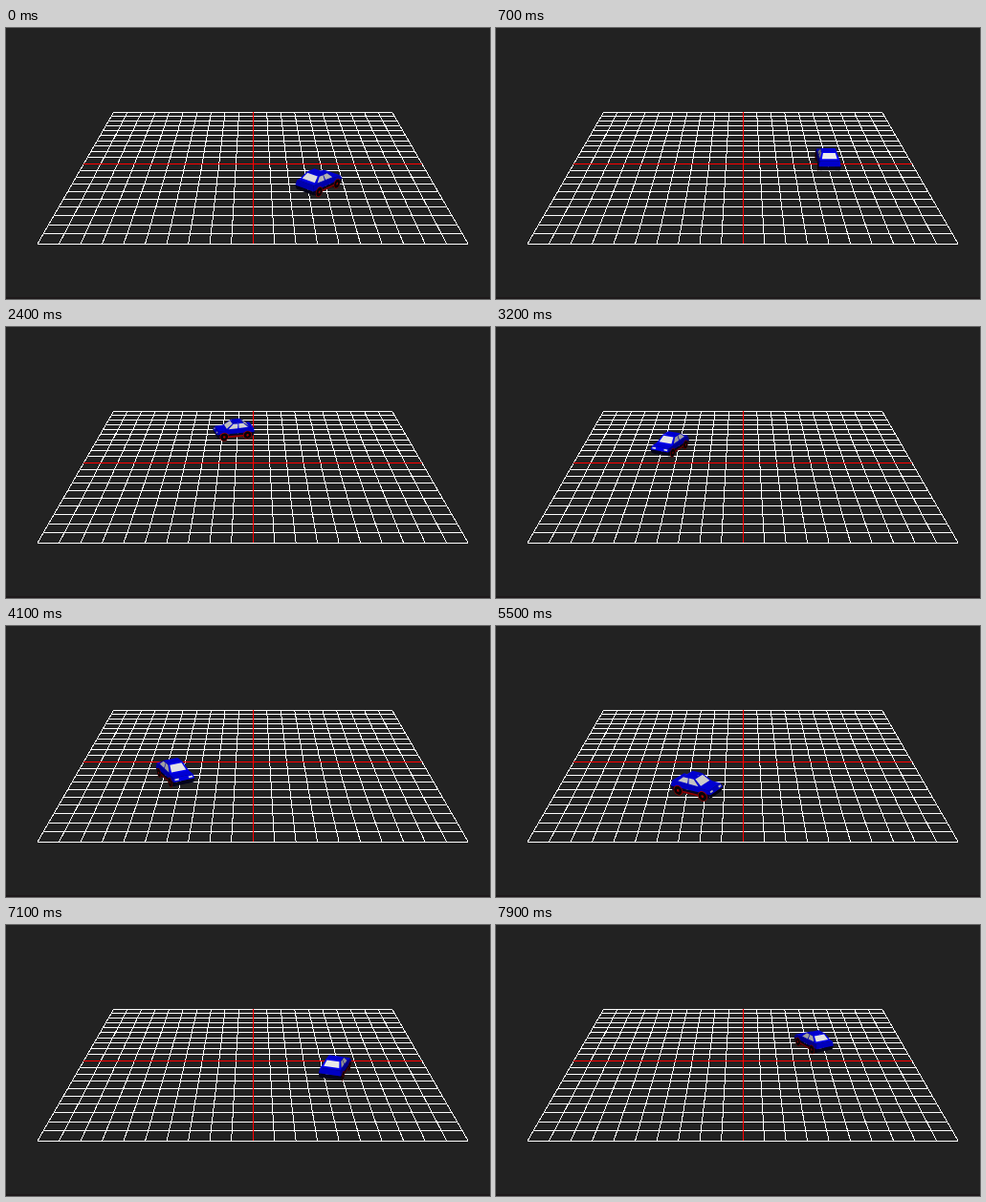
An HTML page for the animation above (8 s loop, 506x284 px).

```html
<!DOCTYPE html>
<html lang="en">
<head>
<meta charset="utf-8">
<title>Car on a grid</title>
<style>
  html, body { margin: 0; height: 100%; overflow: hidden; background: #222; }
  svg { display: block; width: 506px; height: 284px; }
</style>
</head>
<body>
<svg viewBox="0 0 506 284">
  <rect y="282" width="506" height="2" fill="#1e191b"/>
  <g fill="none" shape-rendering="crispEdges">
    <path id="grid" stroke="#fff"/>
    <path id="axes" stroke="#f00"/>
  </g>
  <g id="car"></g>
</svg>
<script>
const STEP = 100, LOOP = 8000, PAUSE_FROM = 45, PAUSE_STEPS = 9;
const RADIUS = 5, START = -43.8, TURN = 6.18;
const BLUE = '0, 0, 245', GLASS = '235, 235, 235', RED = '255, 0, 0',
      NAVY = '10, 10, 60', BLACK = '8, 8, 10';
const byId = id => document.getElementById(id);

// World axes: x right, y up, z towards the viewer.
function project([x, y, z]) {
  const depth = 1 - .0215 * z - .0084 * y;
  return [258.1 + 17.68 * x / depth, 142.45 + (6.59 * z - 16.48 * y) / depth];
}

const line = (a, b) => `M${project(a)}L${project(b)}`;
const cross = i => line([-10, 0, i], [10, 0, i]) + line([i, 0, -10], [i, 0, 10]);
let lines = '';
for (let i = 1; i <= 10; i++) lines += cross(i) + cross(-i);
byId('grid').setAttribute('d', lines);
byId('axes').setAttribute('d', cross(0));

// Car points are [forward, up, right]; visible faces run clockwise.
const faces = [];
const face = (points, color, bothSides) => faces.push({ points, color, bothSides });

const ring = (back, front, half, upBack, upFront = upBack) =>
  [[back, upBack, -half], [front, upFront, -half], [front, upFront, half], [back, upBack, half]];

// Solid between two rings; returns its left, front, right and back faces.
function block(low, high, color) {
  const sides = low.map((_, i) => {
    const j = (i + 1) % 4;
    return [high[j], high[i], low[i], low[j]];
  });
  for (const side of [...sides, high]) face(side, color);
  return sides;
}

// Part of a quad, given as fractions across and down.
function patch([a, b, c, d], u0, u1, v0, v1, color) {
  const mix = (p, q, t) => p.map((v, i) => v + (q[i] - v) * t);
  const at = (u, v) => mix(mix(a, b, u), mix(d, c, u), v);
  face([at(u0, v0), at(u1, v0), at(u1, v1), at(u0, v1)], color);
}

function disc(f, s, r, color, bothSides) {
  const points = Array.from({ length: 16 }, (_, i) => {
    const a = i * Math.PI / 8 * Math.sign(s);
    return [f - r * Math.cos(a), .25 + r * Math.sin(a), s];
  });
  face(points, color, bothSides);
}

function eachWheel(draw) {
  for (const f of [-.77, .77]) for (const side of [-1, 1]) draw(f, side);
}

function buildCar() {
  eachWheel((f, side) => {
    for (const s of [.4, .5, .6]) disc(f, side * s, .25, BLACK, true);
  });

  const waist = ring(-1.25, 1.25, .63, .42);
  const [left, , right] = block(ring(-1.17, 1.17, .6, .16), waist, NAVY);
  const [, nose] = block(waist, ring(-1.18, 1.12, .58, .72, .62), BLUE);
  for (const u of [.06, .74]) patch(nose, u, u + .2, .3, .7, GLASS);

  for (const side of [left, right]) patch(side, .22, .78, .55, 1, RED);
  eachWheel((f, side) => {
    disc(f, side * .64, .29, RED);
    disc(f, side * .65, .25, BLACK);
    disc(f, side * .66, .08, RED);
  });

  const cabin = block(ring(-.98, .62, .57, .71, .65), ring(-.52, .08, .42, 1.05), BLUE);
  cabin.forEach((side, i) => {
    const spans = i % 2 ? [[.1, .9]] : [[.06, .47], [.53, .94]];
    for (const [from, to] of spans) patch(side, from, to, .14, .86, GLASS);
  });
}

// Light falls from above and from the viewer's side.
function brightness([a, b, c]) {
  const p = c.map((v, i) => v - a[i]), q = b.map((v, i) => v - a[i]);
  const x = p[1] * q[2] - p[2] * q[1],
        y = p[2] * q[0] - p[0] * q[2],
        z = p[0] * q[1] - p[1] * q[0];
  return .25 + .75 * Math.max(0, .8 * y + .6 * z) / Math.hypot(x, y, z);
}

const shade = (color, level) =>
  `rgb(${color.split(',').map(v => Math.round(v * level))})`;

const isClockwise = points => points.reduce((sum, [x, y], i) => {
  const [nx, ny] = points[(i + 1) % points.length];
  return sum + x * ny - nx * y;
}, 0) > 0;

function drawCar(degrees) {
  const a = degrees * Math.PI / 180, cos = Math.cos(a), sin = Math.sin(a);
  const place = ([f, u, s]) =>
    [cos * (RADIUS + s) - sin * f, u - .07, -sin * (RADIUS + s) - cos * f];
  byId('car').innerHTML = faces.map(({ points, color, bothSides }) => {
    const world = points.map(place), screen = world.map(project);
    if (!bothSides && !isClockwise(screen)) return '';
    return `<polygon points="${screen.join(' ')}" fill="${shade(color, brightness(world))}"/>`;
  }).join('');
}

function tick() {
  const step = Math.floor(performance.now() % LOOP / STEP);
  const moved = step <= PAUSE_FROM ? step : Math.max(PAUSE_FROM, step - PAUSE_STEPS);
  drawCar(START + TURN * moved);
  requestAnimationFrame(tick);
}

buildCar();
tick();
</script>
</body>
</html>
```
